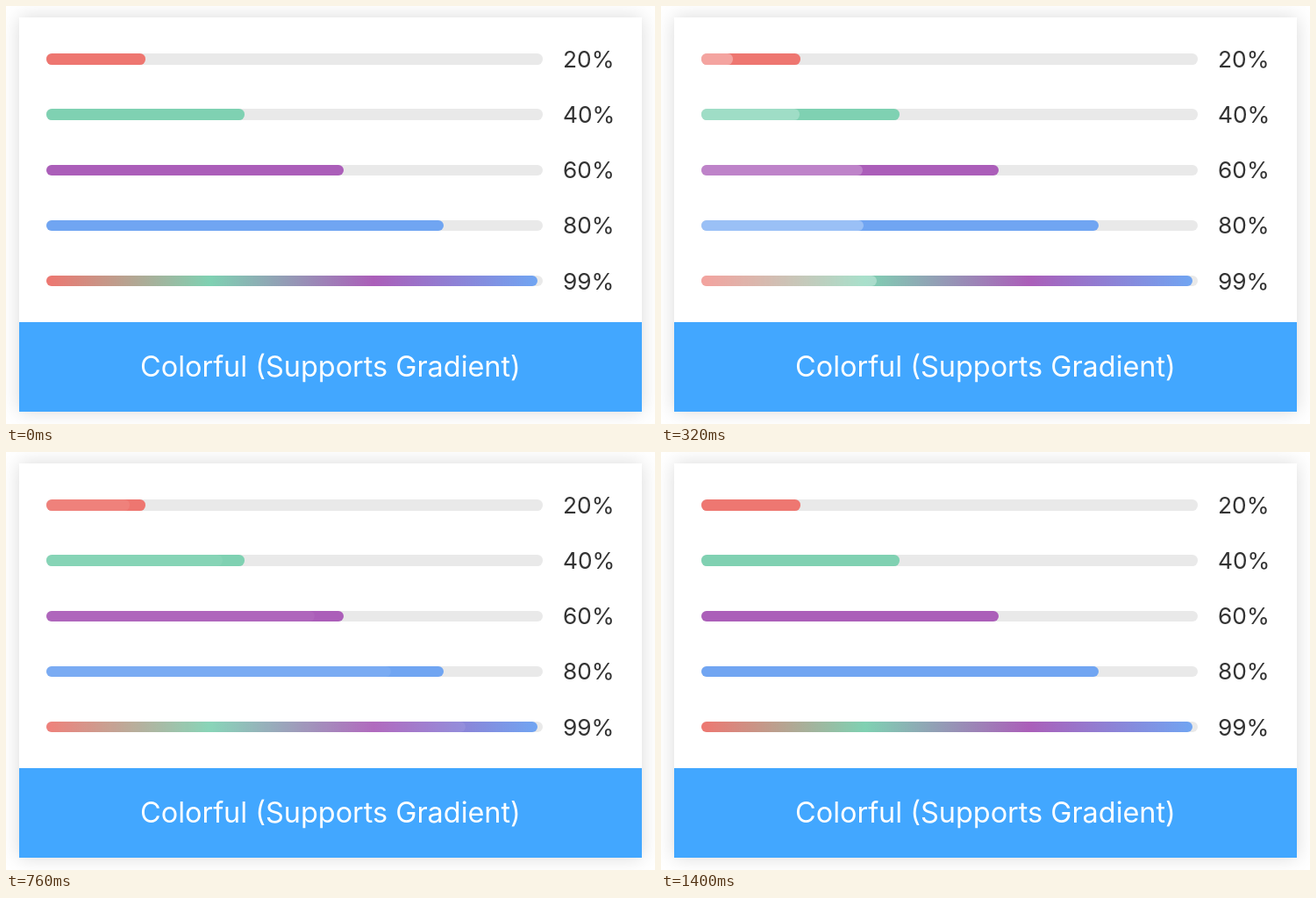
Recreate the animation shown at these times as an HTML page. Size 740 by 476 pixels, loop 1440 ms.

```html
<!DOCTYPE html>
<html lang="en">
<head>
<meta charset="utf-8">
<title>Progress bars</title>
<style>
  html, body { margin: 0; width: 100%; height: 100%; overflow: hidden; background: #fff; }
  body { position: relative; font-family: Inter, Roboto, sans-serif; }
  .card { position: absolute; left: 15px; top: 13px; width: 710px; height: 449px;
    background: #fff; box-shadow: 0 0 20px rgba(0, 0, 0, .15); }
  .track, .fill, .shine { position: absolute; height: 12.6px; border-radius: 6.3px; }
  .track { left: 30.5px; width: 566.5px; background: #e9e9e9; }
  .fill, .shine { left: 0; top: 0; }
  .shine { background: #fff; }
  .label { position: absolute; left: 620px; font-size: 26.3px; line-height: 32px; color: #333; }
  .footer { position: absolute; left: 0; bottom: 0; width: 100%; height: 102px;
    background: #42a7ff; color: #fff; font-size: 32.4px; line-height: 102px;
    text-align: center; white-space: nowrap; }
</style>
</head>
<body>
<div class="card"><div class="footer">Colorful (Supports Gradient)</div></div>
<script>
const LOOP = 1440, STEP = 40, SWEEP = 2000;
const RED = '#ee7670', GREEN = '#7fd1b2', PURPLE = '#ab5eb9', BLUE = '#70a5f2';
const rows = [
  { percent: 20, paint: RED, start: 161 },
  { percent: 40, paint: GREEN, start: 61 },
  { percent: 60, paint: PURPLE, start: 29 },
  { percent: 80, paint: BLUE, start: 113 },
  { percent: 99, paint: `linear-gradient(90deg, ${[RED, GREEN, PURPLE, BLUE]})`, start: 143 },
];
const card = document.querySelector('.card');

function add(parent, className, style, text = '') {
  const el = document.createElement('div');
  el.className = className;
  el.textContent = text;
  Object.assign(el.style, style);
  return parent.appendChild(el);
}

rows.forEach((row, i) => {
  const y = 47.4 + i * 63.2;
  const track = add(card, 'track', { top: y - 6.3 + 'px' });
  const fill = add(track, 'fill', { width: row.percent + '%', background: row.paint });
  row.shine = add(fill, 'shine', {});
  add(card, 'label', { top: y - 15.6 + 'px' }, row.percent + '%');
});

// cubic-bezier(.23, 1, .32, 1), solved for x by bisection
function easeOut(x) {
  let lo = 0, hi = 1;
  for (let i = 0; i < 24; i++) {
    const s = (lo + hi) / 2, r = 1 - s;
    if (.69 * r * r * s + .96 * r * s * s + s ** 3 < x) lo = s; else hi = s;
  }
  return 1 - (1 - lo) ** 3;
}

function draw(now) {
  const t = Math.floor(now % LOOP / STEP) * STEP;
  for (const { shine, start } of rows) {
    const p = t > start ? easeOut((t - start) / SWEEP) : 0;
    shine.style.width = p * 100 + '%';
    shine.style.opacity = (1 - p) / 2;
  }
  requestAnimationFrame(draw);
}
draw(performance.now());
</script>
</body>
</html>
```
